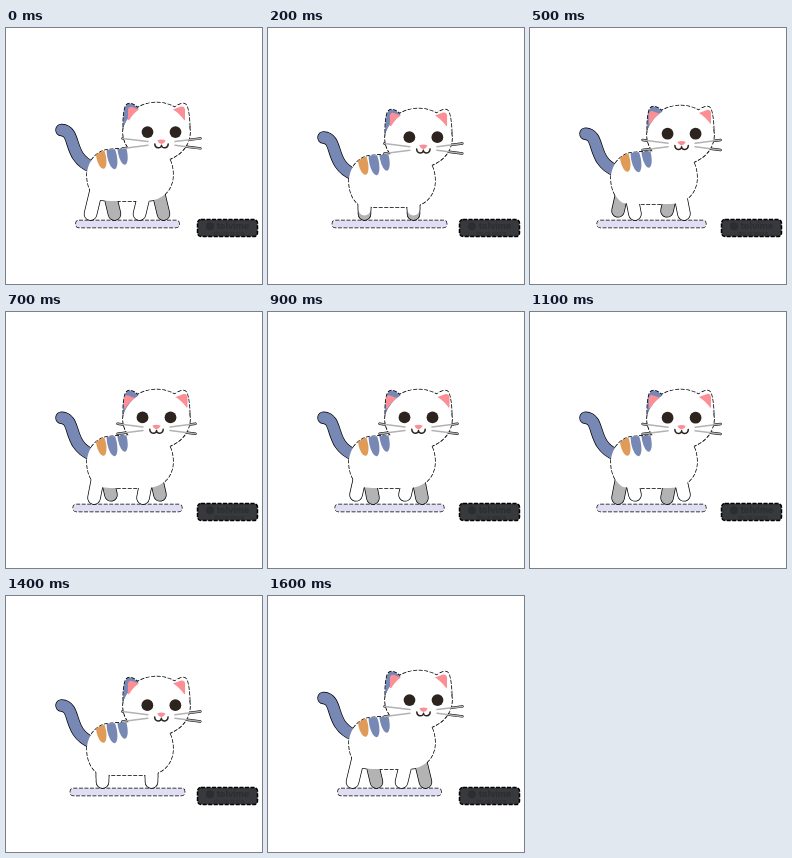
These frames come from a looping animation (256x256 px, 1700 ms). An HTML page with a canvas:

```html
<!DOCTYPE html>
<html lang="en">
<head>
<meta charset="utf-8">
<title>Walking cat</title>
<style>
  html, body { margin: 0; width: 100%; height: 100%; overflow: hidden; background: #fff; }
  canvas { display: block; }
</style>
</head>
<body>
<canvas id="stage" width="256" height="256"></canvas>
<script>
const ctx = document.getElementById('stage').getContext('2d');
const LOOP = 1700, STEP = 100, CYCLE = 800;
const BLUE = '#7888b4', ORANGE = '#e09b58', PINK = '#fc8f95', GREY = '#b3b3b3',
      DARK = '#2d231f', LAVENDER = '#dfdef3', EDGE = 1.5;

const tail = new Path2D('M55.5 102C71 103 61 129 86 139');
const torso = new Path2D('M124 120L104 121.5C90 122 81 135 81 147C81 159 86 168 93 172' +
  'L104 173H140C157 173 167 161 167 147C167 139 165 132 161 127Z');
const leftEar = new Path2D('M117.3 99C117 90 118 83 119.3 79Q120.8 75.2 124.5 75.5Q129 76.5 132.5 80.5Q123 86 117.3 99Z');
const rightEar = new Path2D('M183.7 99C183.5 90 182.5 83 181 78.5Q179.5 74.8 176 75.5Q171 77 167.5 80.5Q178 86 183.7 99Z');
const leftPink = new Path2D('M118 93V83Q118.5 79.5 122 80.5L129 83Q123 87 119 94Z');
const rightPink = new Path2D('M181.5 92V82Q181 78.5 177.5 79L169.5 82Q176 86 181 93Z');
const skull = new Path2D();
skull.ellipse(150.5, 104, 33.5, 29.5, 0, 0, 7);

function fill(path, color) {
  ctx.fillStyle = color;
  ctx.fill(path);
}

function stroke(path, color, width) {
  ctx.strokeStyle = color;
  ctx.lineWidth = width;
  ctx.stroke(path);
}

// thin, slightly broken contour
function outline(path) {
  ctx.save();
  ctx.lineCap = 'butt';
  ctx.setLineDash([4, 1.5]);
  stroke(path, '#000', EDGE);
  ctx.restore();
}

function shifted(dx, dy, draw) {
  ctx.save();
  ctx.translate(dx, dy);
  draw();
  ctx.restore();
}

function roundRect(x, y, w, h, r) {
  const path = new Path2D();
  path.roundRect(x, y, w, h, r);
  return path;
}

function oval(x, y, rx, ry, color, angle = 0) {
  ctx.fillStyle = color;
  ctx.beginPath();
  ctx.ellipse(x, y, rx, ry, angle, 0, 7);
  ctx.fill();
}

function legPair(phase, bob) {
  const swing = -12 * Math.cos(phase);
  const lift = 4.5 * Math.max(0, Math.sin(phase));
  const path = new Path2D();
  for (const x of [96.5, 145.5]) {
    path.moveTo(x + swing / 2, 161 + bob);
    path.lineTo(x + swing, 186 - lift);
  }
  return path;
}

function whiskerPaths() {
  const path = new Path2D();
  for (const side of [-1, 1]) {
    for (const v of [-1, 1]) {
      path.moveTo(150.5 + side * 13.5, 115 + v * 1.8);
      path.lineTo(150.5 + side * 39, 115 + v * 5);
    }
  }
  return path;
}
const whiskers = whiskerPaths();

// 1 while the cat looks ahead, 0 while it faces the viewer
function lookAmount(t) {
  const s = Math.min(1, Math.max(0, (Math.min(t, 1600 - t) - 150) / 500));
  return 1 - s * s * (3 - 2 * s);
}

function drawStripes() {
  ctx.save();
  ctx.clip(torso);
  oval(95.2, 129, 4.8, 12, ORANGE, -0.2);
  oval(106, 128, 4.8, 13.5, BLUE, -0.2);
  oval(116.5, 124, 4.6, 13, BLUE, -0.2);
  ctx.restore();
}

function drawFace() {
  oval(136.5, 103.7, 5.9, 5.9, DARK);
  oval(164.5, 103.7, 5.9, 5.9, DARK);
  stroke(whiskers, '#b2b2b2', 1.5);
  fill(new Path2D('M146.3 112Q150.5 110 154.7 112Q153.3 115 150.5 115.7Q147.7 115 146.3 112Z'), PINK);
  stroke(new Path2D('M143.8 115.5C144 120.5 150.5 120.5 150.5 116.8C150.5 120.5 157 120.5 157.2 115.5'), DARK, 1.5);
}

function drawBadge() {
  const badge = roundRect(191.5, 191.5, 60, 17, 3.5);
  fill(badge, '#37393d');
  outline(badge);
  oval(204, 198.3, 4, 4, '#2b2d31');
  ctx.fillStyle = '#2b2d31';
  ctx.textAlign = 'center';
  ctx.font = 'bold 9px Inter, sans-serif';
  ctx.fillText('tolvime', 227, 201);
  ctx.font = '4px Inter, sans-serif';
  ctx.fillText('little cat walking', 223, 206.5);
}

function draw(t) {
  const phase = 2 * Math.PI * t / CYCLE;
  const bob = 3 - 3 * Math.cos(2 * phase);
  const look = lookAmount(t);
  const whiteLegs = legPair(phase, bob);
  const greyLegs = legPair(phase + Math.PI, bob);
  const half = 51.5 + bob * 0.93;
  const platform = roundRect(121.5 - half, 192.4, half * 2, 7, 3);
  const faceX = 5 * look;
  const faceY = bob * 0.85 + 1.2 * look - 0.8;

  ctx.fillStyle = '#fff';
  ctx.fillRect(0, 0, 256, 256);
  ctx.lineCap = ctx.lineJoin = 'round';

  outline(platform);
  fill(platform, LAVENDER);

  // silhouette edge, later covered by the fills
  stroke(greyLegs, '#000', 12 + EDGE);
  stroke(whiteLegs, '#000', 12 + EDGE);
  shifted(0, bob * 1.25, () => stroke(tail, '#000', 11 + EDGE));
  shifted(0, bob, () => [torso, skull, leftEar, rightEar].forEach(outline));
  shifted(faceX, faceY, () => stroke(whiskers, '#000', 2.4));

  shifted(0, bob * 1.25, () => stroke(tail, BLUE, 11));
  stroke(greyLegs, GREY, 12);
  stroke(whiteLegs, '#fff', 12);
  shifted(0, bob, () => {
    fill(torso, '#fff');
    drawStripes();
    fill(skull, '#fff');
    fill(leftEar, BLUE);
    fill(rightEar, '#fff');
    shifted(4 * look, -1.5 * look, () => fill(leftPink, PINK));
    shifted(-2.5 * look, -0.5 * look, () => fill(rightPink, PINK));
  });
  shifted(faceX, faceY, drawFace);
  drawBadge();
}

const start = performance.now();
function tick() {
  const t = (performance.now() - start) % LOOP;
  draw(Math.floor(t / STEP) * STEP);
  requestAnimationFrame(tick);
}
tick();
</script>
</body>
</html>
```
